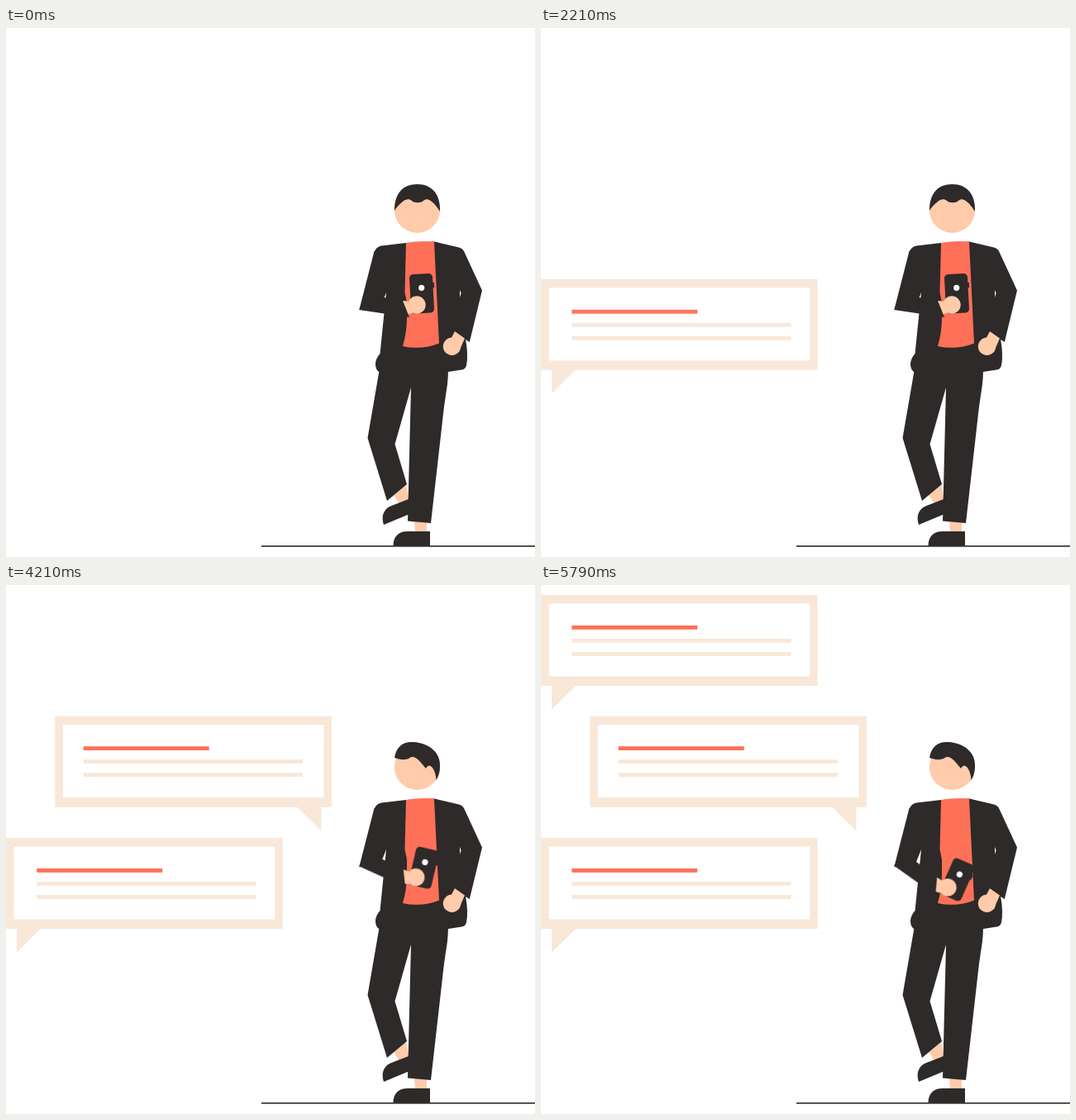
Write an HTML page that moves like this. It is 640x640 px and loops after 7070 ms.

```html
<!DOCTYPE html>
<html lang="en">
<head>
<meta charset="utf-8">
<title>Man with phone and messages</title>
<style>
  :root {
    --ink: #2d2a29;
    --coral: #ff7058;
    --skin: #ffcbaa;
    --cream: #f9e7d8;
    --drop: linear(0, .09 15%, .175 26%, .3 39.5%, .525 54%, .7 65%, .797 70.6%,
      .893 76%, .963 81.7%, .985 87%, .995 95%, 1);
    --swing: cubic-bezier(.37, 0, .63, 1);
  }
  html, body { margin: 0; width: 100%; height: 100%; overflow: hidden; background: #fff; }
  svg { display: block; width: 100%; height: 100%; }

  .ink { fill: var(--ink); }
  .coral { fill: var(--coral); }
  .skin { fill: var(--skin); }
  .cream { fill: var(--cream); }

  .bubble, .forearm, .hair { animation: 7070ms infinite both; }
  .bubble { animation-timing-function: var(--drop); }
  .first { animation-name: first; }
  .second { animation-name: second; }
  .third { animation-name: third; }
  .forearm {
    transform-origin: 430px 340px;
    animation-name: lower;
    animation-timing-function: var(--swing);
  }
  .hair { animation-name: turn; animation-timing-function: var(--swing); }

  @keyframes first {
    0%, 16.46% { opacity: 0; transform: translateY(-60px); }
    34.64%, 100% { opacity: 1; transform: translateY(0); }
  }
  @keyframes second {
    0%, 40.16% { opacity: 0; transform: translateY(-60px); }
    58.33%, 100% { opacity: 1; transform: translateY(0); }
  }
  @keyframes third {
    0%, 63.56% { opacity: 0; transform: translateY(-60px); }
    81.74%, 100% { opacity: 1; transform: translateY(0); }
  }
  @keyframes lower {
    0%, 41.02% { transform: rotate(0deg); }
    74.26%, 100% { transform: rotate(27deg); }
  }
  @keyframes turn {
    0%, 41.02% {
      d: path("M470 221C470 200 480 189 497.5 189C516 189 526 202 525 222C522 217 518 212 515 210C511 206.5 508 206.5 505 209C502 212 494 212 491 209C488 206.5 484 206.5 480 210C476 213 472 217 470 221Z");
    }
    49.5%, 100% {
      d: path("M470 209C472 196 480 189 493 190C512 191 526 203 525 219C525 227 523 232 520.5 236C520 226 516 219 512 218.5C510 219 509 220 508 222C499 211 494 205 488 209.5C483 212.5 475 211 470 209Z");
    }
  }
</style>
</head>
<body>
<svg viewBox="0 0 640 640">
  <defs>
    <clipPath id="stage"><rect y="12" width="640" height="628"/></clipPath>
    <path id="frame" class="cream" fill-rule="evenodd" d="M0 0H334.5V110H0ZM9.5 10.5V98.5H325.3V10.5Z"/>
    <g id="lines">
      <rect class="coral" width="152" height="4.8"/>
      <rect class="cream" y="16" width="265.3" height="4.8"/>
      <rect class="cream" y="32" width="265.3" height="4.8"/>
    </g>
    <g id="leftBubble">
      <use href="#frame"/>
      <path class="cream" d="M13 109V138.500L43 109Z"/>
      <use href="#lines" x="37.200" y="37"/>
    </g>
  </defs>

  <g clip-path="url(#stage)">
    <g class="bubble first"><use href="#leftBubble" y="306"/></g>
    <g class="bubble second">
      <use href="#frame" x="59.300" y="158.800"/>
      <path class="cream" d="M351.500 268H381.300V297.500Z"/>
      <use href="#lines" x="93.700" y="195.200"/>
    </g>
    <g class="bubble third"><use href="#leftBubble" y="12"/></g>
  </g>

  <path d="M309 626.800H640" stroke="#3b3939" stroke-width="1.800"/>

  <!-- legs and shoes -->
  <path class="skin" d="M469 565L484 553L488 572L477 577ZM494 596H509V611H495Z"/>
  <path class="ink" d="M487 570V588.500L457 601C453 589 458 580 469 577ZM468.500 626.500C468.500 615 475 609 486 609H513V626.500Z"/>
  <path class="ink" d="M452 412L437.500 496L461 572L485 552L470.500 503.500L490 435L486 596.500L514 599L527.500 480Q530 456 533 438Q535 426 535 410Z"/>

  <!-- jacket and shirt -->
  <path class="ink" d="M484 260L454 263.500Q447.500 265 445.500 271L460 320L458.300 337L452.500 394Q447 400 447 407Q447 414 452.500 417L535 416L551 413.500Q556 413 557 408Q559.500 396 556 376L549 326V318L550 268L518 258.500Z"/>
  <path class="ink" d="M445.500 270L427.300 341L453 337.500L460 320L470 270Z"/>
  <path class="ink" d="M518 258.500L546 265Q552 266 554 270L576 317.500L560.800 380L542 368L549 326L550.500 321L549.500 318L535 290Z"/>
  <path class="coral" d="M484 260Q500 257 518 258.500L524 381.500Q503 390 480 385Q485 368 485 350V332L482.500 320Z"/>

  <!-- hand on hip -->
  <path class="skin" d="M543 367L555 375.500L549 389L536 380Z"/>
  <circle class="skin" cx="539.500" cy="385.300" r="10.700"/>

  <g class="forearm">
    <g transform="rotate(-3 503 321)">
      <rect class="ink" x="489" y="297.500" width="28" height="47.500" rx="4.500"/>
      <rect class="ink" x="516.500" y="308.500" width="2" height="6.500"/>
    </g>
    <circle cx="502.700" cy="314.300" r="3.600" fill="#fff"/>
    <path class="ink" d="M427.300 341L488 350L480 330L449 324.500L434 321Z"/>
    <path class="skin" d="M480 330L492 331V345L486.500 346Z"/>
    <circle class="skin" cx="497" cy="335" r="10.700"/>
  </g>

  <!-- head -->
  <circle class="skin" cx="497.500" cy="220.300" r="27.600"/>
  <path class="hair ink" d="M470 221C470 200 480 189 497.500 189C516 189 526 202 525 222Z"/>
</svg>
<script>
  // Hold each pose for one step of the 99-step loop.
  const LOOP = 7070, STEP = LOOP / 99;
  const moves = document.getAnimations();
  moves.forEach(move => move.pause());

  function draw() {
    const step = Math.floor(performance.now() % LOOP / STEP + 0.06);
    moves.forEach(move => { move.currentTime = step % 99 * STEP; });
    requestAnimationFrame(draw);
  }
  draw();
</script>
</body>
</html>
```
